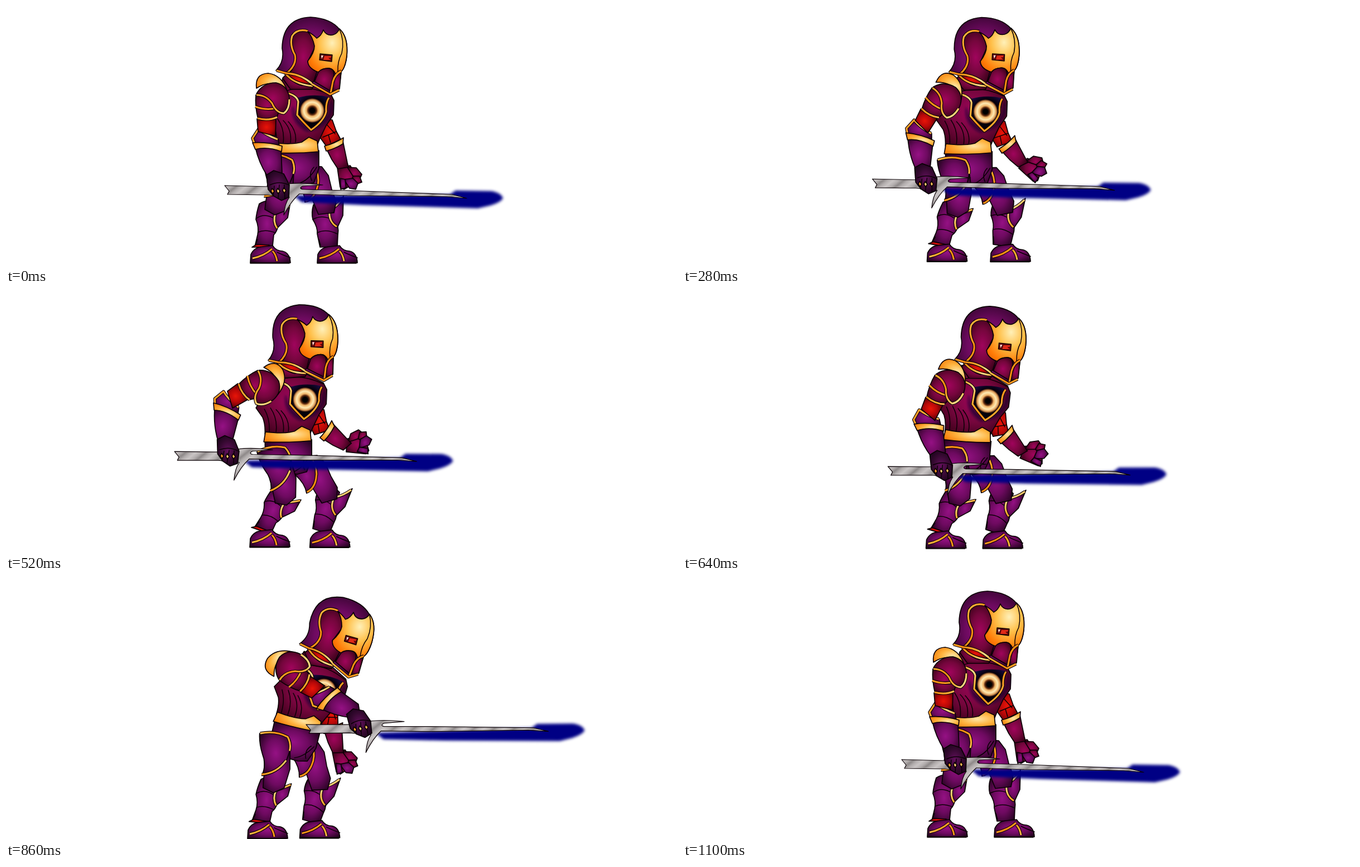
An HTML page for the animation above (1.2 s loop, 1203 px wide and 466 px high).

```html
<!DOCTYPE html>
<html lang="en">
<head>
<meta charset="utf-8">
<title>Knight</title>
<style>
html, body { margin: 0; width: 100%; height: 100%; overflow: hidden; background: #fff; }
svg { display: block; width: 1203px; height: 466px; }
path { stroke: #0a0005; stroke-width: 1.7; stroke-linejoin: round; stroke-linecap: round; }
.p { fill: url(#purple); }
.m { fill: url(#maroon); }
.r { fill: url(#red); }
.g { fill: url(#gold); }
.f { fill: url(#face); }
.s { fill: url(#steel); stroke-width: 1.2; }
.n { fill: url(#night); stroke: none; }
.h { fill: #12062e; fill-opacity: .7; stroke: none; filter: url(#soft); }
.d { fill: url(#dusk); }
.k { fill: none; stroke-width: 1.5; }
.e { fill: #5c0408; stroke-width: 1.3; }
.w { fill: #ffe8e0; stroke: none; }
.v { fill: #e02a18; stroke: none; }
.o { fill: url(#orb); stroke: none; }
.b { fill: #000084; stroke: none; filter: url(#soft); }
.under { fill: none; stroke-width: 5.4; stroke-linecap: butt; }
.trim { fill: none; stroke: url(#trim); stroke-width: 3.1; stroke-linecap: butt; }
</style>
</head>
<body>
<svg id="stage" viewBox="0 0 1203 466" xmlns="http://www.w3.org/2000/svg">
<defs>
  <radialGradient id="purple" r=".64"><stop stop-color="#951184"/><stop offset=".5" stop-color="#6e0a60"/><stop offset="1" stop-color="#24031f"/></radialGradient>
  <radialGradient id="maroon" r=".66"><stop stop-color="#a0045c"/><stop offset=".5" stop-color="#74063c"/><stop offset="1" stop-color="#2c0010"/></radialGradient>
  <radialGradient id="red" r=".65"><stop stop-color="#e81408"/><stop offset=".5" stop-color="#b80808"/><stop offset="1" stop-color="#560008"/></radialGradient>
  <radialGradient id="gold" r=".7" cx=".62"><stop stop-color="#ffe6a6"/><stop offset=".5" stop-color="#ffb440"/><stop offset="1" stop-color="#f57c08"/></radialGradient>
  <radialGradient id="face" r=".8" cx=".62" cy=".3"><stop stop-color="#fff0b8"/><stop offset=".4" stop-color="#ffc04a"/><stop offset=".8" stop-color="#ff7d08"/><stop offset="1" stop-color="#f06400"/></radialGradient>
  <radialGradient id="dusk" r=".7"><stop stop-color="#62105c"/><stop offset=".5" stop-color="#350930"/><stop offset="1" stop-color="#100012"/></radialGradient>
  <radialGradient id="night" r=".6"><stop stop-color="#000"/><stop offset=".7" stop-color="#05000c"/><stop offset="1" stop-color="#160a3c"/></radialGradient>
  <radialGradient id="orb"><stop offset=".2" stop-color="#000"/><stop offset=".34" stop-color="#5a260c"/><stop offset=".48" stop-color="#f0b468"/><stop offset=".68" stop-color="#ffebb4"/><stop offset=".86" stop-color="#e0a05c"/><stop offset="1" stop-color="#2a0c08"/></radialGradient>
  <linearGradient id="steel" gradientUnits="userSpaceOnUse" x1="400" y1="320" x2="407" y2="329" spreadMethod="reflect"><stop stop-color="#c9c4c4"/><stop offset=".55" stop-color="#b2adad"/><stop offset="1" stop-color="#8e8989"/></linearGradient>
  <linearGradient id="trim" gradientUnits="userSpaceOnUse" x1="0" y1="0" x2="34" y2="22" spreadMethod="reflect"><stop stop-color="#ff8c10"/><stop offset=".6" stop-color="#ffae34"/><stop offset="1" stop-color="#ffdc8c"/></linearGradient>
  <filter id="soft" x="-10%" y="-60%" width="120%" height="220%"><feGaussianBlur stdDeviation="2.4"/></filter>
</defs>
</svg>
<script>
const foot = x => {
  const move = d => `M${438 + x} 462` + d;
  return [
    ['p', move('l1-15q6-13 20-14l19-2q6 10 18 10q13 3 14 21z')],
    ['t', move('m4-8q20-4 35-17')],
    ['t', move('m40-21q6 6 8 18')],
    ['k', move('m48-19q10 5 24 10m-72 10h70')]
  ];
};

// Back to front: parent, pivot, shapes drawn in the rest pose.
const parts = {
  farUpper: ['torso', 575, 190, [
    ['r', 'M565 200L585 205L592 225L600 240L574 252L562 235Z'],
    ['k', 'M574 212L590 230M568 236L592 226M578 232L582 246']]],
  farHand: ['farFore', 605, 290, [
    ['m', 'M594 291L617 287L625 300L630 316L606 330L599 326Z'],
    ['m', 'M612 290L628 291L638 303L634 312L622 306Z'],
    ['m', 'M622 306L634 306L638 317L630 320L620 314Z'],
    ['p', 'M606 312L622 310L631 319L627 330L616 328Z'],
    ['p', 'M599 310L608 312L610 327L600 330Z']]],
  farFore: ['farUpper', 583, 235, [
    ['m', 'M573 254L604 243L612 282L614 290L595 293L584 276Z'],
    ['g', 'M571 252Q588 248 605 237L604 248Q590 257 574 261Z']]],
  farShin: ['farFoot', 578, 432, [
    ['p', 'M551 358Q547 372 550 384Q559 398 558 410L563 434L594 433L595 412Q598 396 588 380L586 356Q566 346 551 358Z'],
    ['k', 'M550 384Q566 375 584 384M558 408Q574 400 594 410M561 420L564 431'],
    ['p', 'M605 342L604 377L594 399Q578 390 579 366Q594 360 605 342Z'],
    ['t', 'M593 397Q578 388 580 368Q594 360 604 345']]],
  farFoot: ['', 578, 445, foot(120)],
  farThigh: ['', 545, 290, [
    ['p', 'M552 288L566 289L578 305L584 330L592 352L588 372L560 375L548 345L535 320Z'],
    ['p', 'M530 300L555 292Q564 312 558 328Q552 348 536 353Q536 335 522 318Z'],
    ['t', 'M557 296Q563 315 557 330Q551 347 537 351']]],
  torso: ['', 520, 262, [
    ['p', 'M477 260L561 260L561 292L552 318L536 322L505 322L478 300Z'],
    ['k', 'M552 290Q542 300 548 314M528 318Q544 312 557 290'],
    ['m', 'M497 128L548 140L582 158L588 170L587 196L574 215L562 240L558 250L477 250Q478 232 473 220L461 203L486 160Z'],
    ['h', 'M514 178Q508 210 540 226Q578 220 586 186L584 166L577 195L547 223L522 200Z'],
    ['k', 'M476 205Q486 222 485 246M487 203Q500 222 497 246M497 206Q513 222 510 246M506 208Q522 225 519 245M505 152Q540 140 582 160'],
    ['n', 'M523 165Q552 157 580 164L575 192Q568 208 547 223Q530 208 522 197Z'],
    ['t', 'M506 157Q522 162 524 172L522 196Q530 206 547 223Q570 207 574 190Q573 174 579 165'],
    ['o', 'M527 188a22 22 0 1 0 44 0a22 22 0 1 0-44 0Z'],
    ['g', 'M478 246Q512 250 530 245L543 236L558 243L560 262Q520 266 475 264Z']]],
  nearShin: ['nearFoot', 462, 430, [
    ['p', 'M454 356Q449 372 448 384Q454 398 451 412L446 433L478 432L480 412Q492 398 486 380L490 355Q470 345 454 356Z'],
    ['k', 'M449 382Q464 371 484 384M452 407Q465 401 483 408M451 420L447 430'],
    ['r', 'M441 434L449 429L472 430L470 434Z'],
    ['p', 'M509 358L505 381L485 401Q478 388 482 371Q496 366 509 358Z'],
    ['t', 'M486 400Q478 388 483 373Q496 367 508 360']]],
  nearFoot: ['', 458, 445, foot(0)],
  nearThigh: ['', 490, 285, [
    ['p', 'M470 300L516 300L514 335L502 368L482 376L464 366L468 335Z'],
    ['p', 'M463 268Q490 262 512 275Q520 282 517 297Q512 312 507 322Q490 343 463 344Q473 325 466 305Q461 285 463 268Z'],
    ['t', 'M464 268Q492 264 513 277Q519 290 515 302'],
    ['t', 'M463 342Q490 341 508 319']]],
  head: ['', 530, 140, [
    ['m', 'M496 130L508 116L555 138L548 150L510 150Z'],
    ['r', 'M503 122Q525 122 546 140L530 143Q512 138 503 122Z'],
    ['t', 'M500 120Q514 140 550 144'],
    ['p', 'M484 116Q500 100 495 76Q496 22 546 20Q582 22 598 42Q614 55 611 90Q609 110 601 118L597 150L580 160L548 139Q530 122 503 122Z'],
    ['m', 'M512 58Q520 42 540 46Q554 56 553 76L541 100Q546 115 558 117L552 135L548 138Q530 124 508 121Q520 108 519 90Q511 75 512 58Z'],
    ['t', 'M541 45Q522 40 513 54Q508 70 518 88Q522 106 503 121L485 116'],
    ['t', 'M503 121Q528 122 549 140'],
    ['f', 'M541 46Q552 52 557 58Q565 54 569 43Q574 54 586 52Q594 50 598 41Q614 56 611 90Q608 112 601 118L592 126Q588 112 578 112Q566 112 560 119Q541 112 541 99Q553 84 553 72Q550 56 541 46Z'],
    ['m', 'M560 119Q566 112 578 112Q588 112 588 124Q584 140 582 153L553 136Z'],
    ['m', 'M601 118L598 149L585 154Q586 140 592 126Z'],
    ['t', 'M601 117Q590 122 586 136L582 157'],
    ['t', 'M548 140L581 159L597 151'],
    ['k', 'M598 42Q607 62 602 85Q594 100 595 118'],
    ['e', 'M563 86L585 88L584 100L562 97Z'],
    ['w', 'M565 89L569 89L566 95Z'],
    ['v', 'M571 90h12l-1 3h-4l4 4h-13z']]],
  sword: ['nearHand', 487, 322, [
    ['b', 'M516 341L796 339L806 332L870 333Q888 336 891 346Q886 354 868 359L846 364L640 358L530 353Z'],
    ['s', 'M392 323L470 325L506 320Q530 317 568 322L532 324Q524 328 532 330L612 332L800 339L826 346L790 343L612 341L526 338Q512 350 498 376Q500 355 508 344L470 340L397 339L400 333Z']]],
  nearFore: ['nearUpper', 466, 232, [
    ['p', 'M441 238L452 220L470 230L488 240L490 252L446 250Z'],
    ['t', 'M446 249L442 238L453 221Q465 232 487 240'],
    ['p', 'M446 250L493 258L495 300L484 312L468 305Q452 280 446 250Z'],
    ['g', 'M442 246Q468 244 495 252L494 262Q468 252 447 258Z']]],
  nearHand: ['nearFore', 479, 300, [
    ['d', 'M467 304L480 296L498 302L508 322L507 344L494 350L480 342L470 330Z'],
    ['k', 'M473 322Q490 314 507 322M481 324L479 342M490 322L488 346M499 322L500 347'],
    ['g', 'M477 328l4 5l-3 5l-3-5zM487 328l4 5l-3 5l-3-5zM498 327l4 5l-3 5l-3-5z']]],
  nearUpper: ['torso', 478, 162, [
    ['r', 'M450 203L484 202L483 234L452 226Z'],
    ['m', 'M448 160L478 154L490 188L485 202L452 204Q446 180 448 160Z'],
    ['t', 'M447 181Q465 188 484 184'],
    ['t', 'M451 202Q470 207 486 200'],
    ['g', 'M449 148Q446 122 470 121Q494 124 504 152Q480 132 456 144Z'],
    ['m', 'M449 158Q460 138 484 138Q505 143 508 165Q508 188 497 194Q484 192 481 180Q470 160 449 158Z'],
    ['t', 'M449 160Q466 160 477 175Q484 192 498 193Q508 186 508 168']]]
};

// Offset and angle at the two ends of the swing: drawn back, thrust forward.
const poses = {
  torso: [[-13.5, 4, 0], [4, 2, 17.5]],
  head: [[-13, 2, -4.2], [45, 8, 12.5]],
  nearThigh: [[-9.5, 8.5, -20], [-9, 8, -3.5]],
  nearFoot: [[-1, -5.5, 0], [-6, 3.5, 0]],
  nearShin: [[0, 0, 20], [0, 0, 7.6]],
  farThigh: [[-8, 7, -10], [-8, 3, 4]],
  farFoot: [[-14, -5, 0], [-38, 2, 0]],
  farShin: [[0, 0, 21], [0, 0, 21.5]],
  nearUpper: [[0, 0, 62], [0, 0, -70]],
  nearFore: [[0, 0, 18.5], [0, 0, -62]],
  nearHand: [[0, 0, 5], [0, 0, -10]],
  sword: [[0, 0, -.7], [0, 0, -1.7]],
  farUpper: [[0, 0, 8], [0, 0, 31]],
  farFore: [[0, 0, -33], [0, 0, 10]],
  farHand: [[0, 0, -80], [0, 0, -4]]
};

// Time in ms, weight of each end pose.
const marks = [
  [0, 0, 0], [50, 0, 0], [180, .26, 0], [360, .68, 0], [520, .95, 0], [580, 1, 0],
  [740, .26, .74], [800, 0, 1], [960, 0, .54], [1100, 0, 0], [1200, 0, 0]
];

const NS = 'http://www.w3.org/2000/svg';
const add = (to, tag, attrs = {}) => {
  const el = document.createElementNS(NS, tag);
  for (const key in attrs) el.setAttribute(key, attrs[key]);
  return to.appendChild(el);
};

const stage = document.getElementById('stage');
const groups = {};
for (const name in parts) {
  const g = groups[name] = add(stage, 'g');
  for (const [kind, d] of parts[name][3]) {
    const layers = kind === 't' ? ['under', 'trim'] : [kind];
    for (const layer of layers) add(g, 'path', { class: layer, d });
  }
}

function weights(t) {
  const i = marks.findIndex(m => m[0] > t);
  const [t0, a0, b0] = marks[i - 1], [t1, a1, b1] = marks[i];
  const u = (t - t0) / (t1 - t0);
  return [a0 + (a1 - a0) * u, b0 + (b1 - b0) * u];
}

function draw(t) {
  const [a, b] = weights(t);
  const done = {};
  const solve = name => {
    if (done[name]) return done[name];
    const [parent, px, py] = parts[name];
    const [back, thrust] = poses[name];
    const [dx, dy, r] = back.map((v, i) => v * a + thrust[i] * b);
    let x = px + dx, y = py + dy;
    if (parent) {
      const p = solve(parent), w = p.r * Math.PI / 180;
      const ox = px - parts[parent][1], oy = py - parts[parent][2];
      x = p.x + ox * Math.cos(w) - oy * Math.sin(w);
      y = p.y + ox * Math.sin(w) + oy * Math.cos(w);
    }
    return done[name] = { x, y, r };
  };
  for (const name in parts) {
    const { x, y, r } = solve(name), [, px, py] = parts[name];
    groups[name].setAttribute('transform', `translate(${x} ${y}) rotate(${r}) translate(${-px} ${-py})`);
  }
}

const start = performance.now();
function tick() {
  const t = (performance.now() - start) % 1200;
  draw(Math.floor(t / 20) * 20);
  requestAnimationFrame(tick);
}
tick();
</script>
</body>
</html>
```
